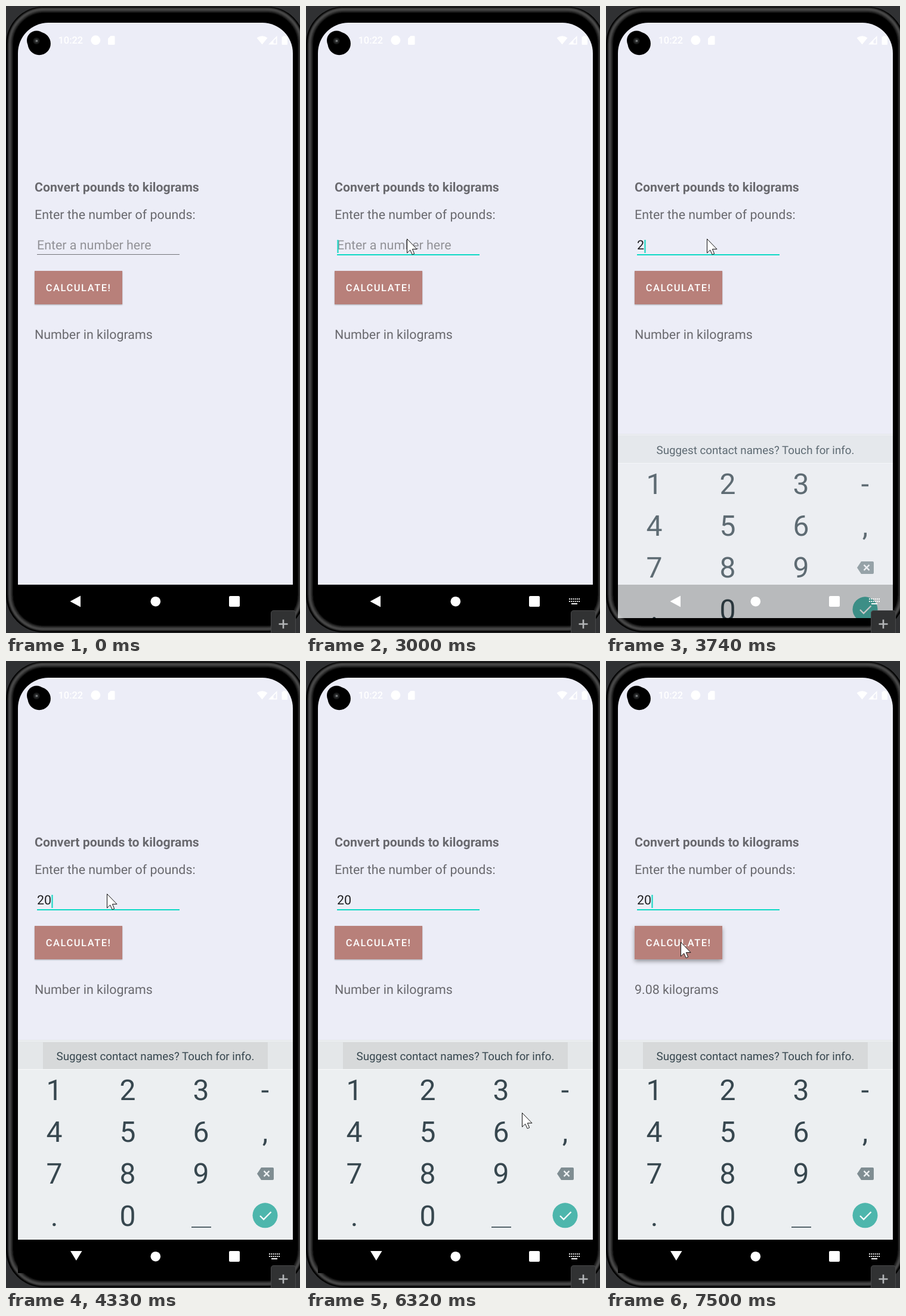
Animation, 493 px wide and 1051 px high, one loop 8000 ms. Source, as an HTML page:

```html
<!DOCTYPE html>
<html lang="en">
<head>
<meta charset="utf-8">
<title>Pounds to kilograms</title>
<style>
  html, body { margin: 0; width: 100%; height: 100%; overflow: hidden; background: #303133; }
  svg { display: block; width: 100%; height: 100%; }
  text { font-family: Roboto, Arial, sans-serif; white-space: pre; text-rendering: geometricPrecision; }
  .body { font-size: 21.4px; fill: #69696e; }
  .title { font-size: 21.25px; font-weight: 700; }
  .hint { fill: #929297; }
  .typed { fill: #1d1d20; }
  .caps { font-size: 16.44px; font-weight: 500; letter-spacing: 1.55px; fill: #fff; }
  .clock { font-size: 16.4px; font-weight: 500; fill: #fff; }
  .tip { font-size: 18.75px; fill: #37474f; text-anchor: middle; }
  .key { font-size: 48px; fill: #37474f; text-anchor: middle; }
</style>
</head>
<body>
<svg viewBox="0 0 493 1051" preserveAspectRatio="none">
  <defs>
    <clipPath id="glass"><rect x="20" y="28" width="461" height="998"/></clipPath>
    <filter id="blur" x="-20%" y="-40%" width="140%" height="180%"><feGaussianBlur id="soft" stdDeviation="1.3"/></filter>
    <filter id="haze"><feGaussianBlur stdDeviation="1"/></filter>
  </defs>

  <!-- phone body -->
  <rect width="493" height="1051" fill="#303133"/>
  <rect x="0" y="1" width="501" height="1049" rx="63"/>
  <g fill="none" filter="url(#haze)">
    <rect x="7" y="6.500" width="487" height="1037" rx="57" stroke="#2b2b2b" stroke-width="8"/>
    <rect x="6" y="5.500" width="489" height="1039" rx="58" stroke="#4c4c4c" stroke-width="3.500"/>
  </g>

  <!-- app screen -->
  <path d="M20 970V79A51 51 0 0 1 71 28H430A51 51 0 0 1 481 79V970Z" fill="#ecedf7"/>
  <circle cx="55.700" cy="63" r="19.200"/>
  <circle cx="51.300" cy="57.800" r="16.300"/>
  <circle cx="51" cy="58.500" r="5.500" fill="#1a1b1b"/>
  <circle cx="51" cy="58.500" r="3" fill="#3a3c3d"/>
  <circle cx="51.500" cy="58.500" r="1.300" fill="#949697"/>

  <text class="clock" x="87.500" y="63.300">10:22</text>
  <g fill="#fff">
    <circle cx="150.300" cy="57.300" r="8"/>
    <path d="M175.500 50H181Q182.500 50 182.500 51.500V63.500Q182.500 65 181 65H172.500Q171 65 171 63.500V54.500Z"/>
    <path d="M420.500 53.600Q429.500 46.800 438.500 53.600L429.500 64.600Z"/>
    <path d="M440 64.500L454.500 50V64.500Z"/>
    <path d="M464.800 51.500V50H469.200V51.500H471Q472 51.500 472 52.500V64Q472 65 471 65H463.500Q462.500 65 462.500 64V52.500Q462.500 51.500 463.500 51.500Z"/>
  </g>
  <path d="M448.500 62.800V58.400L452.800 54V62.800Z" fill="#ecedf7"/>

  <text class="body title" x="48" y="311">Convert pounds to kilograms</text>
  <text class="body" x="48" y="357">Enter the number of pounds:</text>
  <text class="body" id="entry" x="52" y="407.500"></text>
  <rect id="line" x="52" width="239"/>
  <rect id="caret" y="392" width="2.300" height="22" fill="#25d8c6"/>

  <rect id="shade" x="48" width="147" height="56" filter="url(#blur)"/>
  <rect x="48" y="444" width="147" height="56" fill="#b8807a"/>
  <text class="caps" x="66.800" y="478">CALCULATE!</text>
  <text class="body" id="result" x="48" y="558"></text>

  <!-- keyboard -->
  <g clip-path="url(#glass)">
    <g id="board">
      <rect x="20" y="635" width="461" height="335" fill="#eceff1"/>
      <rect x="20" y="635" width="461" height="49" fill="#e4e7e9"/>
      <rect x="20" y="636.500" width="461" height="1" fill="#f4f6f7"/>
      <rect id="pad" x="62" y="639" width="377" height="45" fill="#d7d9da"/>
      <rect x="20" y="684" width="461" height="1" fill="#f7f9fa"/>
      <text class="tip" x="250.500" y="669">Suggest contact names? Touch for info.</text>
      <g id="keys"></g>
      <rect x="311" y="948" width="33" height="2" fill="#55646b"/>
      <path d="M421 859.500L428 849H447Q449 849 449 851V868Q449 870 447 870H428Z" fill="#7f8d92"/>
      <path d="M432.500 854.800l9 9m0-9l-9 9" stroke="#eceff1" stroke-width="2.400"/>
      <circle cx="434.500" cy="929.300" r="21" fill="#4db6ac"/>
      <path d="M426 930l6 6 12.500-12.500" fill="none" stroke="#fff" stroke-width="2.400"/>
      <rect x="20" y="970" width="461" height="56"/>
    </g>
  </g>

  <!-- navigation bar -->
  <g fill="#fff">
    <path id="back"/>
    <circle cx="250.800" cy="998.200" r="8.300"/>
    <rect x="374" y="989" width="18" height="18" rx="2"/>
    <g id="ime" fill="none" stroke="#fff" stroke-width="1.900">
      <path d="M441 994H459M441 998H459" stroke-dasharray="1.800 1.440"/>
      <path d="M445 1002H455"/>
    </g>
  </g>

  <!-- side tab -->
  <path d="M444.500 1052V1018Q444.500 1013.500 449 1013.500H481Q485.500 1013.500 485.500 1018V1052Z" fill="#313233" stroke="#48494a"/>
  <path d="M457.500 1036H472.500M465 1028.500V1043.500" stroke="#b4b6b8" stroke-width="2.600"/>

  <path id="mouse" d="M.5 .5V24L5.700 19L9.200 26.700L12.700 25.200L9.400 17.600H17Z" fill="#fff" stroke="#111" stroke-width="1"/>
  <circle id="click" r="18" fill="#ff0" fill-opacity=".47"/>
</svg>
<script>
const LOOP = 8000;
const el = id => document.getElementById(id);
const set = (id, attrs) => { for (const k in attrs) el(id).setAttribute(k, attrs[k]); };
const show = (id, on) => set(id, { visibility: on ? 'visible' : 'hidden' });

// pointer: time, x, y
const PATH = [
  [370, 171, 303], [600, 152, 345], [800, 140, 385], [930, 152, 406], [1070, 169, 390],
  [4920, 169, 390], [5130, 300, 610], [5380, 472, 994], [5560, 455, 960], [5740, 380, 796],
  [6100, 372, 780], [6300, 362, 757], [6330, 362, 757], [6590, 179, 563], [6730, 140, 500], [6860, 125, 471]
];
// caret is on within these spans
const CARET = [[1870, 3410], [3600, 4070], [4330, 4790], [5290, 5820], [6390, 6880], [7360, LOOP]];
const CLICKS = [[1540, 1740], [7150, 7290]];
// keyboard entrance: offset, opacity
const SLIDE = [[320, .18], [165, .5], [82, .78], [36, .92], [14, 1], [4, 1], [0, 1]];
const SLIDE_AT = 3600, SLIDE_STEP = 67, TICK = 70.7;

const inside = (spans, t) => spans.some(([a, b]) => t >= a && t < b);

const rows = ['123-', '456,', '789', '.0'];
const cols = [81, 204, 327, 434.5];
const ns = 'http://www.w3.org/2000/svg';
rows.forEach((row, r) => [...row].forEach((char, c) => {
  const key = document.createElementNS(ns, 'text');
  key.setAttribute('class', 'key');
  key.setAttribute('x', cols[c]);
  key.setAttribute('y', 736 + r * 70.2);
  key.textContent = char;
  el('keys').append(key);
}));

function pointer(t) {
  const s = 370 + Math.floor((t - 370) / TICK) * TICK;
  const i = PATH.findIndex(p => p[0] > s);
  if (i < 0) return PATH[PATH.length - 1].slice(1);
  if (i === 0) return PATH[0].slice(1);
  const [a, b] = [PATH[i - 1], PATH[i]];
  const k = (s - a[0]) / (b[0] - a[0]);
  return [a[1] + (b[1] - a[1]) * k, a[2] + (b[2] - a[2]) * k].map(Math.round);
}

function draw(t) {
  const [x, y] = pointer(t);
  show('mouse', t >= 370);
  set('mouse', { transform: `translate(${x} ${y})` });
  show('click', inside(CLICKS, t));
  set('click', { cx: x, cy: y });

  const typed = t < 3600 ? '' : t < 4330 ? '2' : '20';
  el('entry').textContent = typed || 'Enter a number here';
  set('entry', { class: typed ? 'body typed' : 'body hint' });
  show('caret', inside(CARET, t));
  set('caret', { x: 52.3 + typed.length * 12 });
  set('line', t < 1740 ? { y: 416, height: 1, fill: '#74747a' } : { y: 416, height: 2, fill: '#0fd9c5' });

  const step = Math.min(SLIDE.length - 1, Math.floor((t - SLIDE_AT) / SLIDE_STEP));
  show('board', step >= 0);
  if (step >= 0) set('board', { transform: `translate(0 ${SLIDE[step][0]})`, opacity: SLIDE[step][1] });
  if (step > 2) el('pad').removeAttribute('visibility');
  else show('pad', false);
  set('back', { d: step > 2 ? 'M108 989H127.500L117.800 1005Z' : 'M107.500 998L125 988.500V1007.500Z' });
  show('ime', t >= 3000);

  const lift = Math.max(0, Math.min(1, Math.floor((t - 7220) / 70) / 4));
  set('shade', { y: 445 + lift * 2.5, 'fill-opacity': .3 + lift * .08 });
  set('soft', { stdDeviation: 1.3 + lift * 2.2 });
  el('result').textContent = t < 7360 ? 'Number in kilograms' : '9.08 kilograms';
}

const start = performance.now();
function loop() {
  draw((performance.now() - start) % LOOP);
  requestAnimationFrame(loop);
}
loop();
</script>
</body>
</html>
```
